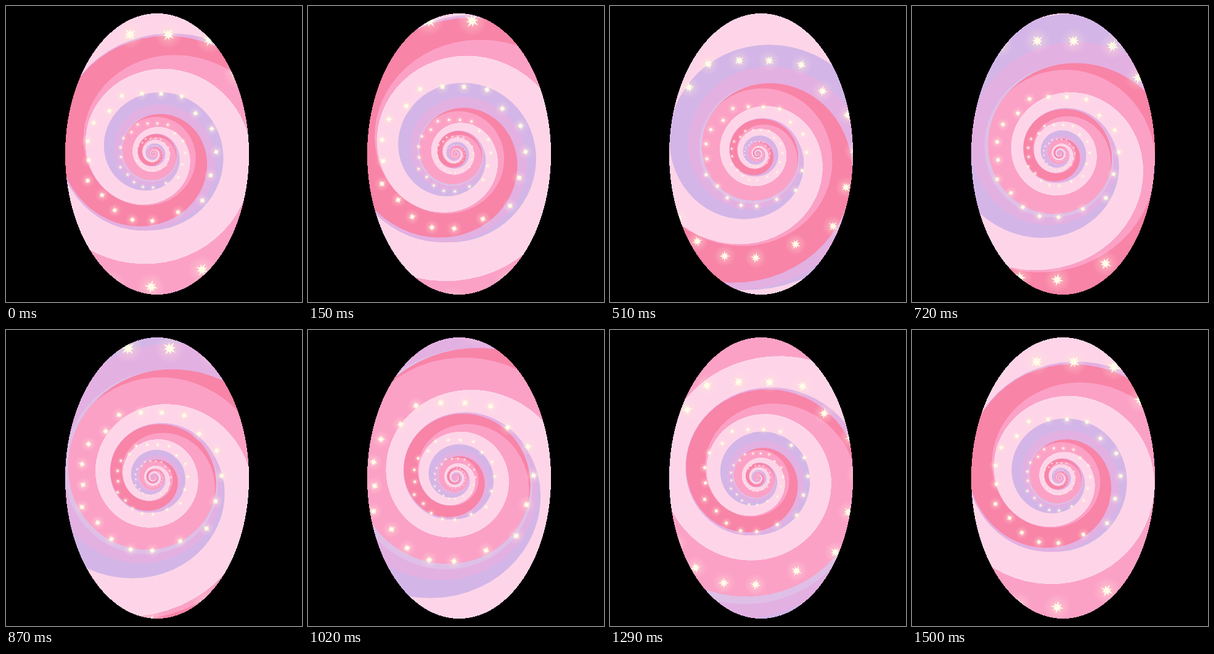
An HTML page with a canvas for the animation above (1.53 s loop, 480x480 px).

```html
<!DOCTYPE html>
<html lang="en">
<head>
<meta charset="utf-8">
<title>Candy spiral</title>
<style>
html, body { margin: 0; width: 100%; height: 100%; overflow: hidden; background: #000; }
canvas { display: block; }
</style>
</head>
<body>
<canvas id="stage" width="480" height="480"></canvas>
<script>
const ctx = document.getElementById('stage').getContext('2d');
const { PI, cos, sin, exp, log, min, max, sqrt, round, floor } = Math;
const TAU = 2 * PI;
const LOOP = 1530, STEP = 30, STEPS = 50;
const CENTER = 239.5;
const SPIRAL_ZOOM = 6;    // growth over two turns, and over one loop
const STAR_ZOOM = 1.985;  // growth over half a loop
const STARS = 19;

// Logarithmic spiral that swings in and out once every two turns.
// The turn t is measured clockwise from the top.
const edge = (size, swing, lean) => t =>
  exp(size + swing * cos(t / 2 - lean) + t * log(SPIRAL_ZOOM) / (2 * TAU));

const lavender = edge(4.446, .166, -.442);
const orchid = edge(4.368, 0, 0);
const lilac = edge(4.23, .083, 3.53);
const rose = edge(4.251, .112, 2.65);
const pink = edge(4.122, .152, -1.803);
const inner = edge(3.896, .14, 2.75);

const bands = [
  ['#d3b6e7', ribbon(lavender)],
  ['#e3b0e2', ribbon(orchid)],
  ['#dfbfe6', ribbon(lilac)],
  ['#f884a7', ribbon(rose)],
  ['#fca1c6', ribbon(t => min(rose(t), pink(t)))]
];
const egg = crispEllipse(245, 240, 149, 228);

function ribbon(outer) {
  const path = new Path2D(), from = -9 * TAU, to = 4 * TAU, step = TAU / 60;
  const add = (radius, t) => path.lineTo(radius(t) * sin(t), -radius(t) * cos(t));
  for (let t = from; t <= to; t += step) add(outer, t);
  for (let t = to; t >= from; t -= step) add(inner, t);
  path.closePath();
  return path;
}

// Built from whole pixel rows, so its rim is not smoothed.
function crispEllipse(cx, cy, rx, ry) {
  const path = new Path2D();
  for (let y = cy - ry; y < cy + ry; y++) {
    const half = round(rx * sqrt(1 - ((y + .5 - cy) / ry) ** 2));
    path.rect(cx - half, y, half * 2, 1);
  }
  return path;
}

// Unevenly spaced stars on a wavy ring.
function starPlace(i) {
  const part = i / STARS;
  const angle = 1.59 - part * TAU - .37 * sin(part * PI) - .07 * sin(part * TAU);
  const radius = 105 + 6 * cos(part * TAU + 1) + 5 * cos(2.417 * (i - 2));
  return [radius * cos(angle), radius * sin(angle)];
}

function drawStar(x, y, size, tilt) {
  const reach = size * 2.2;
  const glow = ctx.createRadialGradient(x, y, 0, x, y, reach);
  glow.addColorStop(0, 'rgba(255,240,215,.6)');
  glow.addColorStop(.45, 'rgba(255,230,215,.25)');
  glow.addColorStop(1, 'rgba(255,225,220,0)');
  ctx.fillStyle = glow;
  ctx.fillRect(x - reach, y - reach, reach * 2, reach * 2);

  ctx.beginPath();
  for (let i = 0; i < 16; i++) {
    const r = size * (i % 2 ? .42 : i % 4 ? .85 : 1.1);
    const angle = tilt + i * TAU / 16;
    ctx.lineTo(x + r * cos(angle), y + r * sin(angle));
  }
  ctx.fillStyle = '#fffde8';
  ctx.fill();
}

function draw(time) {
  const step = max(0, floor(time / STEP) - 1);
  ctx.fillStyle = '#000';
  ctx.fillRect(0, 0, 480, 480);

  ctx.save();
  ctx.clip(egg);
  ctx.fillStyle = '#fed5e8';
  ctx.fillRect(0, 0, 480, 480);
  ctx.translate(CENTER, CENTER);

  ctx.save();
  const zoom = SPIRAL_ZOOM ** (step / STEPS);
  ctx.scale(zoom, zoom);
  for (const [color, path] of bands) {
    ctx.fillStyle = color;
    ctx.fill(path);
  }
  ctx.restore();

  const phase = step * 2 / STEPS % 1;
  for (let ring = -4; ring <= 1; ring++) {
    const scale = STAR_ZOOM ** (ring + phase);
    for (let i = 0; i < STARS; i++) {
      const [x, y] = starPlace(i);
      drawStar(x * scale, y * scale, 5.2 * scale, .2 + i * .25);
    }
  }
  ctx.restore();
}

const start = performance.now();
function tick() {
  draw((performance.now() - start) % LOOP);
  requestAnimationFrame(tick);
}
tick();
</script>
</body>
</html>
```
